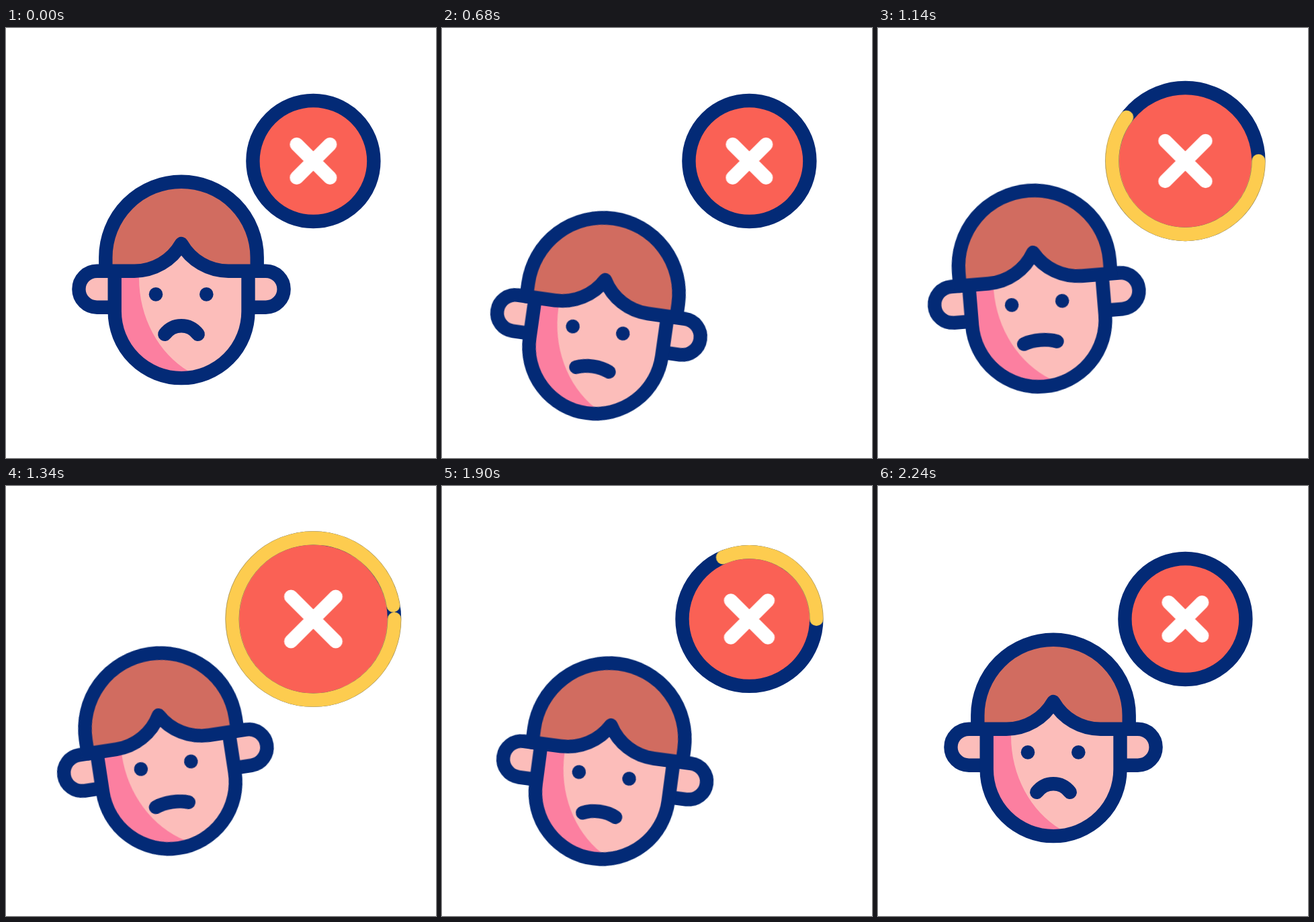
An HTML page without scripts for the animation above (2400 ms loop, 640 by 640 pixels).

```html
<!DOCTYPE html>
<html lang="en">
<head>
<meta charset="utf-8">
<title>Sad face with cross badge</title>
<style>
  :root {
    --navy: #032a76;
    --skin: #fcbdba;
    --ease: cubic-bezier(.3333, 0, .6667, 1);
  }
  html, body { margin: 0; width: 100%; height: 100%; overflow: hidden; background: #fff; }
  svg { display: block; width: 100%; height: 100%; }

  .line {
    stroke: var(--navy);
    stroke-width: 20.4;
    stroke-linecap: round;
    stroke-linejoin: round;
  }
  .skin { fill: var(--skin); }
  .hair { fill: #d16c60; }
  .shade { fill: #fc7fa0; }
  .eye { fill: var(--navy); }
  .mouth, .ring, .cross { fill: none; }
  .disc { fill: #fa6155; }
  .ring { stroke: #fdcc4f; stroke-dasharray: 1 2; }
  .cross { stroke: #fff; }

  .move, .tilt, .mouth, .disc, .ring, .cross {
    animation: 2.4s var(--ease) infinite;
  }
  .move { animation-name: move; }
  .tilt { animation-name: tilt; transform-origin: 261px 375px; }
  .mouth { animation-name: mouth; }
  .disc { animation-name: swell; }
  .ring { animation-name: swell, trim; }
  .cross { animation-name: cross; }

  @keyframes move {
    0%, 8.333%, 91.667%, 100% { transform: translate(0, 0); }
    29.167%, 70.833% { transform: translate(-25.8px, 53.6px); }
    50% { transform: translate(-25.8px, 11.3px); }
  }
  @keyframes tilt {
    0%, 8.333%, 91.667%, 100% { transform: rotate(0deg); }
    33.333%, 75% { transform: rotate(9deg); }
    54.167% { transform: rotate(-9deg); }
  }
  @keyframes mouth {
    0%, 8.333%, 91.667%, 100% {
      d: path("M236.3 455.8C243 447 251.5 443.3 261 443.3C270.5 443.3 279 447 285.7 455.8");
    }
    33.333%, 75% {
      d: path("M236.3 455.8C244 453 252 451.8 261 451.8C270 451.8 278 453 285.7 455.8");
    }
  }
  @keyframes swell {
    0%, 33.333%, 91.667%, 100% { r: 90px; }
    58.333% { r: 121.5px; }
  }
  @keyframes cross {
    0%, 33.333%, 91.667%, 100% {
      d: path("M-24.8 -24.8L24.8 24.8M24.8 -24.8L-24.8 24.8");
    }
    58.333% {
      d: path("M-33.5 -33.5L33.5 33.5M33.5 -33.5L-33.5 33.5");
    }
  }
  @keyframes trim {
    0%, 33.333% { stroke-dashoffset: 1; opacity: 0; }
    33.34%, 91.66% { opacity: 1; }
    58.333% { stroke-dashoffset: 0; }
    91.667%, 100% { stroke-dashoffset: -1; opacity: 0; }
  }
</style>
</head>
<body>
<svg viewBox="0 0 640 640">
  <g transform="translate(457.4 198)">
    <circle class="line disc" r="90"/>
    <circle class="line ring" r="90" pathLength="1"/>
    <path class="line cross" d="M-24.8 -24.8L24.8 24.8M24.8 -24.8L-24.8 24.8"/>
  </g>

  <g class="move"><g class="tilt">
    <path id="ear" class="line skin" d="M161.7 361.7H135.4A27 27 0 0 0 135.4 415.7H161.7"/>
    <use href="#ear" transform="matrix(-1 0 0 1 522 0)"/>

    <path class="skin" d="M161.7 335V421.8A99.4 99.4 0 0 0 360.5 421.8V335Z"/>
    <path class="shade" d="M161.7 350H198V372C198 431 227 484 272 511L285 518.3L261 521.3A99.4 99.4 0 0 1 161.7 421.8Z"/>
    <path class="line" fill="none" d="M161.7 361.7V421.8A99.4 99.4 0 0 0 360.5 421.8V361.7"/>

    <path class="line hair" d="M148.3 361.7V341.4A112.7 112.7 0 0 1 373.7 341.4V361.7H331A80.6 80.6 0 0 1 261 321A80.6 80.6 0 0 1 191 361.7Z"/>

    <circle class="eye" cx="223" cy="396.4" r="10.3"/>
    <circle class="eye" cx="298.3" cy="396.4" r="10.3"/>
    <path class="line mouth" d="M236.3 455.8C243 447 251.5 443.3 261 443.3C270.5 443.3 279 447 285.7 455.8"/>
  </g></g>
</svg>
</body>
</html>
```
